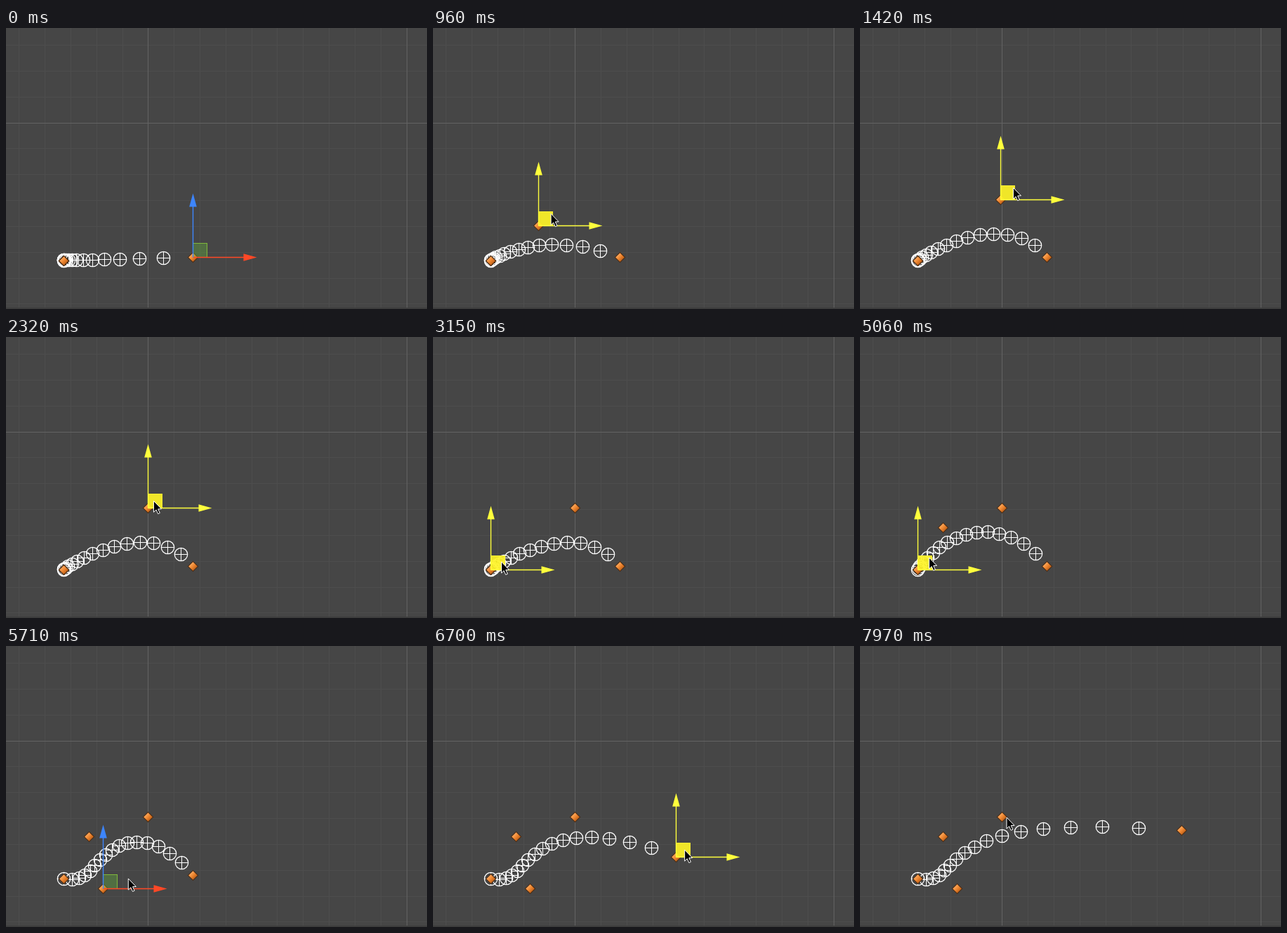
Write an HTML page with a canvas that moves like this. It is 600 by 400 pixels and loops after 8 s.

```html
<!DOCTYPE html>
<html lang="en">
<head>
<meta charset="utf-8">
<title>Curve handles</title>
<style>
html, body { margin: 0; width: 100%; height: 100%; overflow: hidden; background: #464646; }
canvas { display: block; }
</style>
</head>
<body>
<canvas id="stage" width="600" height="400"></canvas>
<script>
const ctx = document.getElementById('stage').getContext('2d');
const LOOP = 8000, STEP = 60, SAMPLES = 16, SQUARE = 20;
const HOME = { x: 82.5, y: 331 }, TAIL = { x: 266.8, y: 326.9 };

// The pointer enters, grabs a handle at an offset (grip), drags it and may leave.
const drags = [
  { handle: 3, pick: 130, to: { x: 202, y: 243.2 }, grip: { x: 18, y: -17 },
    enter: { t: 520, end: 690, x: 165, y: 331 }, move: { t: 690, end: 1570 } },
  { handle: 2, pick: 2880, to: { x: 118, y: 271.6 }, grip: { x: 15, y: -11 },
    enter: { t: 2320, end: 3090, x: 220, y: 226 }, move: { t: 3210, end: 3450 },
    leave: { t: 3450, end: 3630, x: -12, y: 271 } },
  { handle: 1, pick: 4190, to: { x: 138.8, y: 345 }, grip: { x: 16, y: -17 },
    enter: { t: 4590, end: 5060, x: 0, y: 266 }, move: { t: 5280, end: 5640 },
    leave: { t: 5640, end: 6050, x: 294, y: 350 } },
  { handle: 4, pick: 6230, to: { x: 458, y: 262.9 }, grip: { x: 12, y: -10 },
    enter: { t: 6110, end: 6410, x: 294, y: 350 }, move: { t: 6570, end: 7330 },
    leave: { t: 7510, end: 7970, x: 209, y: 244 } }
];
const bursts = drags.flatMap(d => [d.enter.t, d.move.t, d.leave ? d.leave.t : 0])
  .sort((a, b) => a - b);

const last = (list, test) => list.filter(test).pop();
const add = (a, b) => ({ x: a.x + b.x, y: a.y + b.y });
const mix = (a, b, u) => ({ x: a.x + (b.x - a.x) * u, y: a.y + (b.y - a.y) * u });
const snap = p => ({ x: Math.floor(p.x) + 0.5, y: Math.floor(p.y) + 0.5 });
const easeOut = u => 1 - (1 - u) ** 2;
const easeIn = u => u ** 1.6;

// The first step of a span already shows some movement.
function progress(span, q) {
  if (q < span.t) return 0;
  return Math.min(1, (q + STEP - span.t) / (span.end - span.t));
}

function handlesAt(q) {
  const points = [HOME, HOME, HOME, HOME, TAIL];
  for (const d of drags) {
    points[d.handle] = mix(points[d.handle], d.to, easeOut(progress(d.move, q)));
  }
  return points;
}

function pointerAt(q, points) {
  const d = last(drags, d => d.enter.t <= q);
  if (!d) return null;
  const held = add(points[d.handle], d.grip);
  if (q < d.enter.end) return mix(d.enter, held, progress(d.enter, q));
  return d.leave ? mix(held, d.leave, easeIn(progress(d.leave, q))) : held;
}

// De Casteljau: blend neighbours until one point is left.
function bezier(points, u) {
  while (points.length > 1) {
    points = points.slice(1).map((p, i) => mix(points[i], p, u));
  }
  return points[0];
}

function line(x0, y0, x1, y1, color, width = 1) {
  ctx.strokeStyle = color;
  ctx.lineWidth = width;
  ctx.beginPath();
  ctx.moveTo(x0, y0);
  ctx.lineTo(x1, y1);
  ctx.stroke();
}

function poly(points, fill) {
  ctx.fillStyle = fill;
  ctx.beginPath();
  points.forEach(p => ctx.lineTo(p[0], p[1]));
  ctx.closePath();
  ctx.fill();
}

function drawGrid() {
  ctx.fillStyle = '#464646';
  ctx.fillRect(0, 0, 600, 400);
  for (const major of [false, true]) {
    const color = major ? '#636363' : '#4d4d4d';
    for (let i = -5; i <= 10; i++) {
      if ((i % 10 === 0) !== major) continue;
      const p = snap({ x: 202.83 + i * 36.82, y: 135.09 + i * 36.82 });
      line(p.x, 0, p.x, 400, color);
      line(0, p.y, 600, p.y, color);
    }
  }
  ctx.fillStyle = '#3d3d3d';
  ctx.fillRect(0, 398, 600, 2);
}

function drawMarker(p) {
  const { x, y } = snap(p), r = 9.2;
  ctx.strokeStyle = '#fff';
  ctx.lineWidth = 1.25;
  ctx.beginPath();
  ctx.arc(x, y, r, 0, 2 * Math.PI);
  ctx.stroke();
  line(x - r, y, x + r, y, '#fff');
  line(x, y - r, x, y + r, '#fff');
}

function drawDiamond(p) {
  const { x, y } = snap(p);
  const rhomb = r => [[x, y - r], [x + r, y], [x, y + r], [x - r, y]];
  const shade = ctx.createLinearGradient(x - 4, y - 4, x + 4, y + 4);
  shade.addColorStop(0, '#ffb066');
  shade.addColorStop(0.5, '#ee8630');
  shade.addColorStop(1, '#b95c16');
  poly(rhomb(7.8), '#4c2c14');
  poly(rhomb(6.3), shade);
}

function drawGizmo(p, hot) {
  const { x, y } = snap(p);
  const up = hot ? '#ffff3c' : '#3d85fc', right = hot ? '#ffff3c' : '#ff4826';
  ctx.fillStyle = hot ? 'rgba(255,245,40,.92)' : 'rgba(100,180,60,.36)';
  ctx.fillRect(x, y - SQUARE, SQUARE, SQUARE);
  ctx.strokeStyle = hot ? '#f6ee32' : '#7fb83c';
  ctx.lineWidth = 1;
  ctx.strokeRect(x, y - SQUARE, SQUARE, SQUARE);
  line(x, y, x + 73, y, right, 1.4);
  line(x, y, x, y - 73, up, 1.4);
  poly([[x + 72, y - 5.3], [x + 91, y], [x + 72, y + 5.3]], right);
  poly([[x - 5.3, y - 72], [x, y - 91], [x + 5.3, y - 72]], up);
}

function drawPointer({ x, y }) {
  const shape = [[0, 0], [0, 16], [3.6, 12.6], [6.2, 18.4], [8.8, 17.2], [6.2, 11.6], [11, 11.4]];
  poly(shape.map(([dx, dy]) => [x + dx, y + dy]), '#000');
  ctx.strokeStyle = '#fff';
  ctx.lineWidth = 1;
  ctx.stroke();
}

function draw(t) {
  const start = last(bursts, b => b <= t);
  const q = start + Math.floor((t - start) / STEP) * STEP;
  const points = handlesAt(q);
  const pointer = pointerAt(q, points);
  const picked = last(drags, d => d.pick <= t);
  const active = points[picked ? picked.handle : 4];
  const over = d => d >= 0 && d <= SQUARE + 1;
  const hot = pointer && over(pointer.x - active.x) && over(active.y - pointer.y);

  drawGrid();
  for (let i = 0; i < SAMPLES; i++) drawMarker(bezier(points, i / SAMPLES));
  points.forEach(drawDiamond);
  if (t < 7960) drawGizmo(active, hot);
  if (pointer) drawPointer(pointer);
}

const origin = performance.now();
function tick() {
  draw((performance.now() - origin) % LOOP);
  requestAnimationFrame(tick);
}
tick();
</script>
</body>
</html>
```
